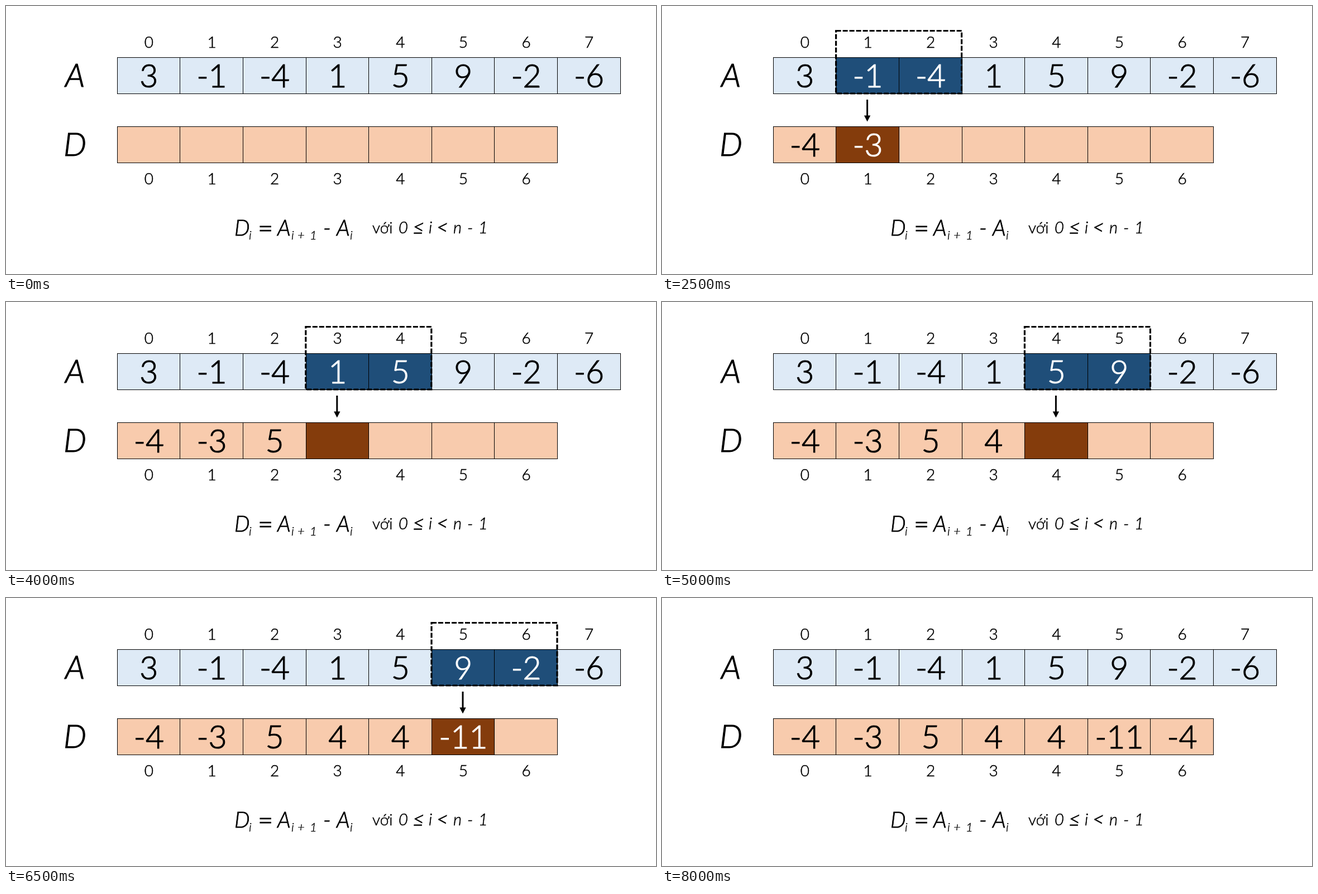
Animation of 1164x481 px, one loop 10 s. Source, as an HTML page:

```html
<!DOCTYPE html>
<html lang="vi">
<head>
<meta charset="utf-8">
<title>Difference array</title>
<style>
  html, body { margin: 0; width: 100%; height: 100%; overflow: hidden; background: #fff; }
  svg { display: block; width: 100%; height: 100%; }
  text {
    font-family: Lato, "Open Sans", sans-serif; font-weight: 300;
    fill: #000; stroke: #000; stroke-width: .02em;
  }
  rect { stroke: #000; stroke-width: 1; shape-rendering: crispEdges; }
  .a rect { fill: #deeaf6; }
  .d rect { fill: #f8cbad; }
  .a.on rect { fill: #1f4e79; }
  .d.on rect { fill: #843c0c; }
  .on text { fill: #fff; stroke: #fff; }
  .value, .index { text-anchor: middle; }
  .value { font-size: 57px; }
  .index { font-size: 28px; }
  .name { font-size: 58px; font-style: italic; }
  .formula { font-size: 39px; font-style: italic; }
  .equals { font-size: 47px; }
  .sub { font-size: 22px; font-style: italic; }
  .range { font-size: 29px; font-style: italic; }
  .compare { font-size: 37px; font-style: italic; }
  .word { font-size: 28px; }
  .frame { fill: none; stroke: #000; stroke-width: 3.2; stroke-dasharray: 9 3; }
</style>
</head>
<body>
<svg id="stage" viewBox="0 0 1164 481">
  <g id="cells"></g>
  <g id="labels"></g>
  <g id="cursor">
    <path class="frame" d="M199 44.5H424V157H199Z"/>
    <path d="M255 168V198" stroke="#000" stroke-width="3"/>
    <path d="M249.3 196.5H260.7L255 207.5Z"/>
  </g>
</svg>
<script>
  const LOOP = 10000, START = 1000, STEP = 1000, REVEAL = 500;
  const LEFT = 198.8, PITCH = 112.6;
  const source = [3, -1, -4, 1, 5, 9, -2, -6];
  const diffs = source.slice(1).map((v, i) => v - source[i]);
  const cells = document.getElementById('cells');
  const labels = document.getElementById('labels');
  const cursor = document.getElementById('cursor');

  function add(parent, tag, attrs, content = '') {
    const el = document.createElementNS('http://www.w3.org/2000/svg', tag);
    for (const key in attrs) el.setAttribute(key, attrs[key]);
    el.textContent = content;
    parent.append(el);
    return el;
  }

  const edge = i => Math.round(LEFT + PITCH * i) + 0.5;
  const label = (kind, x, y, str) => add(labels, 'text', { class: kind, x, y }, str);
  const line = (kind, y, parts) => parts.forEach(([x, str]) => label(kind, x, y, str));

  function makeRow(values, kind, top, indexY) {
    return values.map((value, i) => {
      const x = LEFT + 0.8 + PITCH * (i + 0.5);
      const group = add(cells, 'g', { class: kind });
      add(group, 'rect', { x: edge(i), y: top, width: edge(i + 1) - edge(i), height: 65 });
      const text = add(group, 'text', { class: 'value', x, y: top + 53 }, value);
      label('index', x, indexY, i);
      return { group, text };
    });
  }

  const rowA = makeRow(source, 'a', 92.5, 75);
  const rowD = makeRow(diffs, 'd', 216.5, 319.5);

  line('name', 145, [[106, 'A']]);
  line('name', 269, [[103, 'D']]);
  line('formula', 412, [[409, 'D'], [486, 'A'], [568, '-'], [592, 'A']]);
  line('equals', 415, [[451, '=']]);
  line('sub', 419, [[435, 'i'], [511, 'i'], [522, '+'], [544, '1'], [616, 'i']]);
  line('word', 408, [[656, 'với']]);
  line('range', 408, [[703, '0'], [757, 'i'], [801, 'n'], [826, '-'], [846, '1']]);
  line('compare', 410, [[728, '≤'], [771, '<']]);

  function draw(now) {
    const t = now % LOOP;
    const step = Math.floor((t - START) / STEP);
    const active = step >= 0 && step < diffs.length;
    rowA.forEach(({ group }, i) =>
      group.classList.toggle('on', active && (i === step || i === step + 1)));
    rowD.forEach(({ group, text }, i) => {
      group.classList.toggle('on', active && i === step);
      text.style.display = t >= START + i * STEP + REVEAL ? '' : 'none';
    });
    cursor.style.display = active ? '' : 'none';
    cursor.setAttribute('transform', `translate(${PITCH * step} 0)`);
  }

  const begin = performance.now();
  function tick() {
    draw(performance.now() - begin);
    requestAnimationFrame(tick);
  }
  tick();
</script>
</body>
</html>
```
